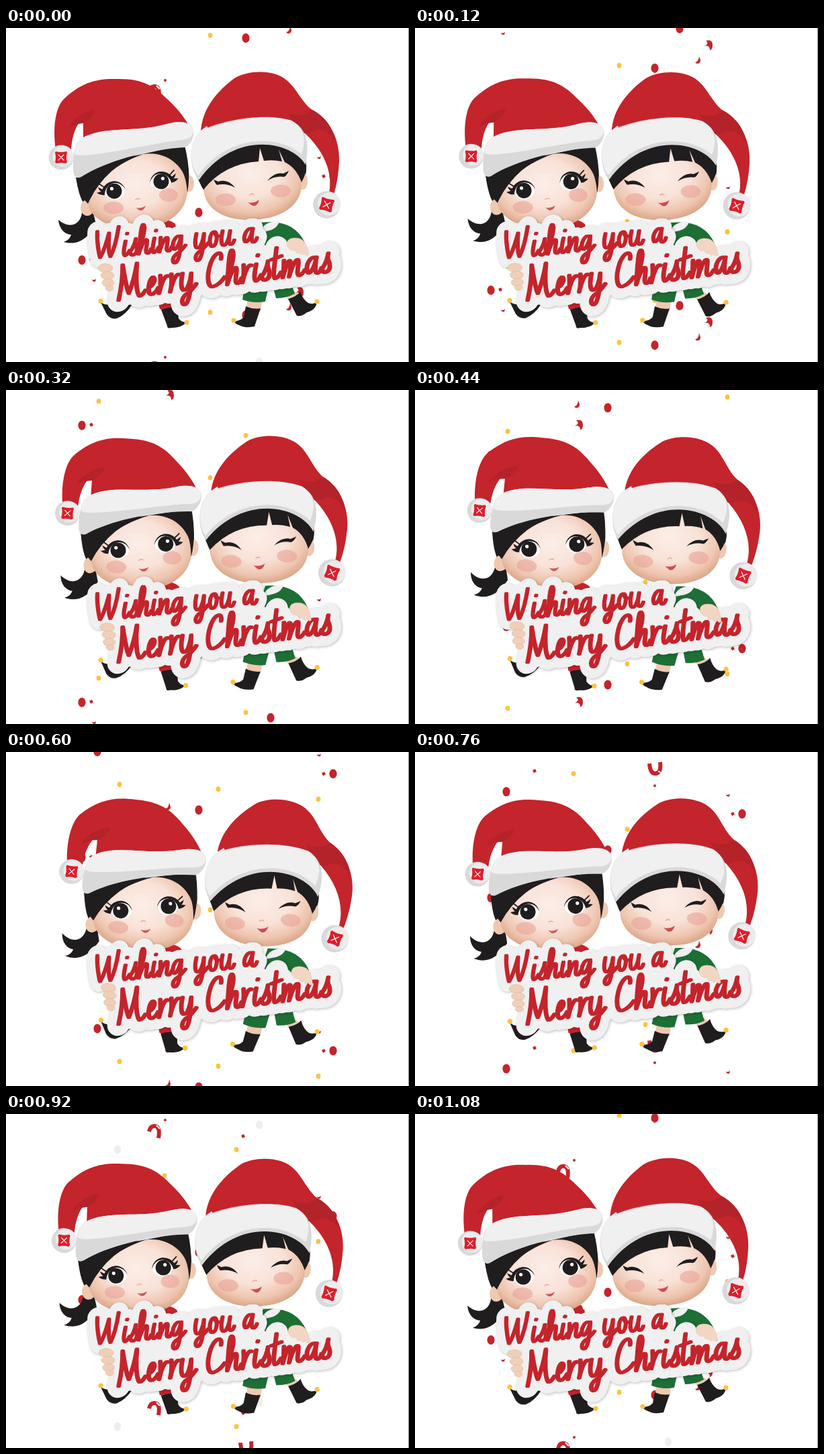
Animation of 600 by 498 pixels, one loop 1120 ms. Source, as an HTML page:

```html
<!DOCTYPE html>
<html lang="en">
<head>
<meta charset="utf-8">
<title>Merry Christmas</title>
<style>
html, body { margin: 0; height: 100%; overflow: hidden; background: #fff }
svg { display: block; width: 600px; height: 498px }
.red { fill: #c4242b } .dark { fill: #b32329 } .fur { fill: #f0f0f1 } .shade { fill: #d9d9da }
.black { fill: #201d1e } .skin { fill: #efc8b0 } .face { fill: url(#skin) }
.green { fill: #1d6f36 } .gold { fill: #fbc33f } .cheek { fill: #eaa398; opacity: .6 }
.line { fill: none; stroke-linecap: round; stroke-linejoin: round }
</style>
</head>
<body>
<svg viewBox="0 0 600 498" role="img" aria-label="Wishing you a Merry Christmas">
<defs>
  <radialGradient id="skin" cx=".47" cy=".4" r=".62">
    <stop offset="0" stop-color="#fbeee8"/><stop offset=".5" stop-color="#f9e2d8"/>
    <stop offset=".8" stop-color="#eec5af"/><stop offset="1" stop-color="#d9a283"/>
  </radialGradient>
  <g id="pom">
    <circle r="18.5" class="shade"/><circle cx="3" cy="-2" r="15.5" fill="#ececed"/>
    <path d="M-8-9Q0-7 8-9L9-7Q7 0 9 7L7 9Q0 7-7 9L-9 7Q-7 0-9-7Z" fill="#dc1f2b"/>
    <path d="M-4-4L4 4M4-4L-4 4" class="line" stroke="#fff" stroke-width="1.1"/>
  </g>
  <g id="eye">
    <ellipse rx="15" ry="13" fill="#fff"/>
    <circle cx="-1" r="11.5" class="black"/>
    <circle cx="-4" cy="-4" r="2.6" fill="#fff"/>
    <path class="black" d="M16 0Q13-13 0-15Q-12-15-18-5L-24-9Q-23-4-20-2L-27-1Q-22 4-16 4Q-13-10 0-12Q11-12 16 0Z"/>
    <path d="M-15-8L-22-14" class="line" stroke="#201d1e" stroke-width="1.8"/>
  </g>
  <g id="confetti"></g>
  <g id="words"></g>
</defs>

<g id="fall">
  <use href="#confetti" y="-413"/><use href="#confetti"/><use href="#confetti" y="413"/>
</g>

<g data-sway="4.5 235 410">
  <path class="red" d="M180 345L192 292Q235 278 252 292L262 340ZM220 380H252L256 420Q242 424 229 419Z"/>
  <path class="skin" d="M170 398L188 404L180 418L163 409Z"/>
  <path class="black" d="M141 409Q150 415 158 411L166 402L188 412Q178 428 165 433Q156 435 150 427ZM231 420Q245 415 255 417L257 433Q262 440 269 438Q263 447 246 447Q240 449 240 444Z"/>
  <circle class="gold" cx="141" cy="407" r="3.6"/><circle class="gold" cx="269" cy="439" r="3.6"/>
</g>

<g data-sway="4.5 345 415">
  <path class="skin" d="M360 400H382L379 422L358 417ZM408 395L426 390L436 397L421 405Z"/>
  <path class="green" d="M366 345L380 290Q428 284 445 320L445 350ZM356 380H392L386 408Q368 411 352 405ZM396 380H424L430 396Q418 403 402 403Z"/>
  <path class="fur" d="M378 306Q382 288 407 288Q404 300 388 303Z"/>
  <path class="black" d="M357 415Q368 420 379 418L370 445Q355 448 347 443Q341 441 339 437Q349 437 354 431ZM420 404Q432 401 438 393Q442 405 450 410Q458 413 463 408Q462 420 448 424Q440 431 433 429Z"/>
  <circle class="gold" cx="339" cy="436" r="3.6"/><circle class="gold" cx="463" cy="408" r="3.6"/>
</g>

<g data-sway="6.3 225 330">
  <path class="black" d="M113 266C116 290 98 303 78 286C79 300 88 308 97 308Q95 316 86 319C104 324 120 318 134 292L128 268Z"/>
  <path class="black" d="M103 210Q106 252 120 268L270 244Q278 215 262 175Z"/>
  <ellipse class="skin" cx="121" cy="268" rx="10" ry="12"/><ellipse class="skin" cx="273" cy="232" rx="7" ry="12"/>
  <path class="face" d="M122 262C127 238 152 207 204 188C244 182 270 212 270 240C271 275 237 299 195 299C156 300 126 285 122 262Z"/>
  <path class="black" d="M103 216L207 183Q146 208 122 262Q107 248 103 216ZM244 180L266 175Q276 215 270 246Q268 208 244 187Z"/>
  <use href="#eye" transform="translate(162 243)rotate(-8)"/>
  <use href="#eye" transform="translate(230 229)rotate(-8)scale(-1 1)"/>
  <ellipse class="cheek" cx="160" cy="268" rx="15" ry="9.5"/><ellipse class="cheek" cx="242" cy="249" rx="14" ry="10"/>
  <path d="M193 256Q196 253 199 255" class="line" stroke="#e5a893" stroke-width="1.4"/>
  <path d="M193 268Q201 270 208 265Q205 273 199 272Z" fill="#cf5657"/>
  <path class="red" d="M74 182C69 147 74 118 86 106C111 82 134 75 165 76C202 75 220 86 239 105C257 121 271 140 276 154L190 168L115 174L115 134Q99 149 97 181Z"/>
  <path class="dark" d="M133 121Q105 127 92 149Q104 143 115 142Q129 134 133 121Z"/>
  <path class="shade" d="M112 165C145 145 190 157 240 143C262 137 276 141 279 151C281 164 274 174 267 178C222 180 152 196 112 222Q101 227 100 212C99 190 102 171 112 165Z"/>
  <path class="fur" d="M112 165C145 145 190 157 240 143C262 137 276 141 279 151C278 164 272 167 252 168C205 175 165 185 126 189Q100 192 102 186Q104 170 112 165Z"/>
  <use href="#pom" x="82" y="193"/>
</g>

<g data-sway="6 340 390">
  <path class="black" d="M285 215Q287 232 296 244L440 234Q452 215 444 188L380 165Z"/>
  <ellipse class="skin" cx="442" cy="228" rx="7" ry="13"/>
  <path class="face" d="M294 238C298 200 334 172 370 172C410 172 438 200 440 230C442 264 410 285 366 286C322 288 294 267 294 238Z"/>
  <path class="black" d="M284 222Q300 160 370 160Q440 165 447 204Q448 216 440 230Q432 208 415 200L406 181L411 199Q398 196 384 198L378 179L376 199Q325 202 294 241Z"/>
  <g class="black">
    <path d="M341 238Q330 224 316 229L309 226Q311 231 314 234Q328 231 341 238Z"/>
    <path d="M389 228Q400 214 413 217L421 213Q418 220 414 222Q401 220 389 228Z"/>
  </g>
  <ellipse class="cheek" cx="327" cy="256" rx="15" ry="9.5"/><ellipse class="cheek" cx="409" cy="243" rx="15" ry="9.5"/>
  <path d="M363 249Q366 246 369 248" class="line" stroke="#e5a893" stroke-width="1.4"/>
  <path d="M360 260Q369 262 377 256Q374 267 367 265Z" fill="#cf4a50"/>
  <path class="red" d="M290 158C290 120 317 92 340 75C362 62 400 62 418 78C432 89 441 112 456 122C482 136 497 166 496 198Q495 226 488 248L481 246C487 216 474 184 445 157L380 150Z"/>
  <path class="dark" d="M420 127Q438 135 456 122C478 134 488 152 489 168Q478 150 462 152Q450 158 445 157Q430 147 420 127Z"/>
  <path class="shade" d="M290 153C325 136 388 126 425 138C447 149 453 172 446 204C425 168 340 152 287 227C270 205 273 167 290 153Z"/>
  <path class="fur" d="M290 153L299 146L301 150C335 137 390 128 425 138C444 149 448 166 440 188C405 158 330 158 286 220C272 204 273 167 290 153Z"/>
  <use href="#pom" transform="translate(477.5 263.5)rotate(15)scale(1.1)"/>
</g>

<g style="filter:drop-shadow(1px 1px 2px #0004)" class="line" stroke="#f0f0f1" stroke-width="29">
  <path class="fur" stroke="none" d="M134 340L210 302L364 300L366 322L480 343L300 382L180 396Z"/>
  <use href="#words"/>
</g>
<g class="line" stroke="#c4242b" stroke-width="4.2">
  <use href="#words" x="-1"/><use href="#words" x="1"/>
</g>

<g data-sway="4.5 235 410" fill="#efcfb8" stroke="#dfb59b" stroke-width=".6">
  <ellipse cx="148" cy="358" rx="11" ry="6.5"/><ellipse cx="151" cy="369" rx="10" ry="6"/>
  <ellipse cx="152" cy="380" rx="9" ry="6"/><ellipse cx="154" cy="388" rx="6" ry="4"/>
</g>
<g data-sway="4.5 345 415" fill="#f2d6c3" stroke="#e6c2ab" stroke-width=".5">
  <path d="M418 324Q417 314 429 313Q443 312 448 326L451 338Q447 341 444 336Q441 341 437 335Q432 338 430 331Q423 334 418 324Z"/>
</g>
<path d="M599.5 0V498" stroke="#8c8c8c"/>
</svg>

<script>
const LOOP = 1120, STEP = 40, SPEED = .374;
const $ = id => document.getElementById(id);

// Confetti: places at the start of the loop, by kind.
const put = (spots, shape) => spots.map(([x, y]) => `<g transform="translate(${x} ${y})">${shape}</g>`).join('');
const cane = d => `<path d="${d}" fill="none" stroke="#c4242b" stroke-width="6"/>`;
$('confetti').innerHTML =
  put([[304, 11], [357, 361], [138, 310], [465, 259], [343, 122], [316, 244], [169, 237], [236, 161]],
    '<ellipse class="gold" rx="3.4" ry="3.8"/>') +
  put([[357, 15], [287, 275], [113, 346], [394, 369], [487, 221], [136, 188]],
    '<ellipse class="red" rx="5.6" ry="7"/>') +
  put([[377, 85], [166, 122]], '<ellipse rx="5" ry="6.5" fill="#eee"/>') +
  put([[127, 345], [473, 221], [178, 157], [353, 102]],
    '<path class="red" d="M-3-1L1-3L3 1L-1 3Z"/>') +
  put([[237, 78], [357, 179]], '<circle class="red" r="2"/>') +
  put([[131, 376], [466, 193]], '<path class="red" d="M-3-1Q0 1 3-2L2 2Q-2 3-3-1Z"/>') +
  put([[421, 3], [241, 270]], '<path class="red" d="M-4 3Q1 3 2-6L4 0Q4 6-2 5Z"/>') +
  put([[437, 393], [244, 300]], '<path class="red" d="M-4-6Q6-9 6 1Q6 7 2 8Q2 0-6 2Q2-2-4-6Z"/>') +
  put([[221, 95]], cane('M-8 0Q-6-9 1-8Q9-7 6 10') + '<path d="M3-9L8-4" stroke="#fff" stroke-width="2"/>') +
  put([[357, 153]], cane('M-8-7Q-7 8 1 8Q10 7 8-9') + '<path d="M5 4L11 8" stroke="#fff" stroke-width="2"/>');

// Brush lettering: each letter is [advance, strokes], with the baseline at 0.
const bowl = 'M13-19C7-24 0-12 2-4C4 3 11-6 14-20', cup = 'M3-21C0-8 1 0 5 0C9 0 13-10 14-20';
const hook = 'C12-10 11 0 15 0Q18 0 20-6', loop = 'C13-5 12 11 7 17C2 21-1 12 6 6Q13 3 20-6';
const stem = 'M3-21C3-12 2-5 1 0', arch = 'C5-13 11-23 13-19C14-12 9-1 14 0Q17 0 19-6';
const letters = {
  ' ': [12, ''],
  W: [38, 'M2-39C1-25 4-8 6-1C12-10 16-24 19-35C18-22 18-8 21-1C27-12 31-30 33-43'],
  M: [40, 'M4 2C8-14 10-30 10-41C12-25 14-12 17-5C22-16 26-30 28-41C26-25 26-6 30 0Q33 1 38-6'],
  C: [26, 'M20-33C22-44 13-43 7-30C0-12 3 2 10 0Q18-2 24-10'],
  a: [20, bowl + hook], g: [21, bowl + loop], u: [21, cup + hook], y: [20, cup + loop],
  n: [19, stem + arch], h: [19, 'M1-8C7-20 12-39 8-42C4-43 3-18 1 0' + arch],
  m: [30, stem + 'C5-13 9-23 11-19C12-12 10-5 9 0C13-13 19-23 21-19C22-12 17-1 22 0Q25 0 29-6'],
  i: [11, 'M5-21C3-12 1-2 4 0Q7 0 11-7M7-31l.5-1'],
  s: [12, 'M0-4Q7-12 9-23Q7-17 10-11Q12-2 6 0Q2 1 1-3'],
  o: [18, 'M9-21C2-21 0-2 6 0C13 0 15-19 9-21Q11-13 18-14'],
  e: [14, 'M2-9C8-10 12-19 8-21C3-21-1-2 5 0Q10 0 14-7'],
  r: [14, 'M3-22Q4-10 1 0C4-12 9-23 13-20'],
  t: [14, 'M8-38C6-24 2-2 5 0Q9 0 13-7M1-24L14-27']
};
function write(text, x, y, angle, scale) {
  let pen = 0;
  const strokes = [...text].map(c => {
    const [advance, d] = letters[c];
    const path = `<path d="${d}" transform="translate(${pen})"/>`;
    pen += advance;
    return path;
  }).join('');
  return `<g transform="translate(${x} ${y})rotate(${angle})skewX(-6)scale(${scale})">${strokes}</g>`;
}
$('words').innerHTML = write('Wishing you a', 134, 344, -6, 1.03) + write('Merry Christmas', 163, 404, -7.3, 1.19);

const swaying = [...document.querySelectorAll('[data-sway]')].map(el => [el, ...el.dataset.sway.split(' ')]);
const start = performance.now();
function draw() {
  const t = Math.floor((performance.now() - start) % LOOP / STEP) * STEP;
  const lean = (1 - Math.cos(2 * Math.PI * t / LOOP)) / 2;
  for (const [el, angle, x, y] of swaying) el.setAttribute('transform', `rotate(${angle * lean} ${x} ${y})`);
  $('fall').setAttribute('transform', `translate(0 ${SPEED * t})`);
  requestAnimationFrame(draw);
}
draw();
</script>
</body>
</html>
```
